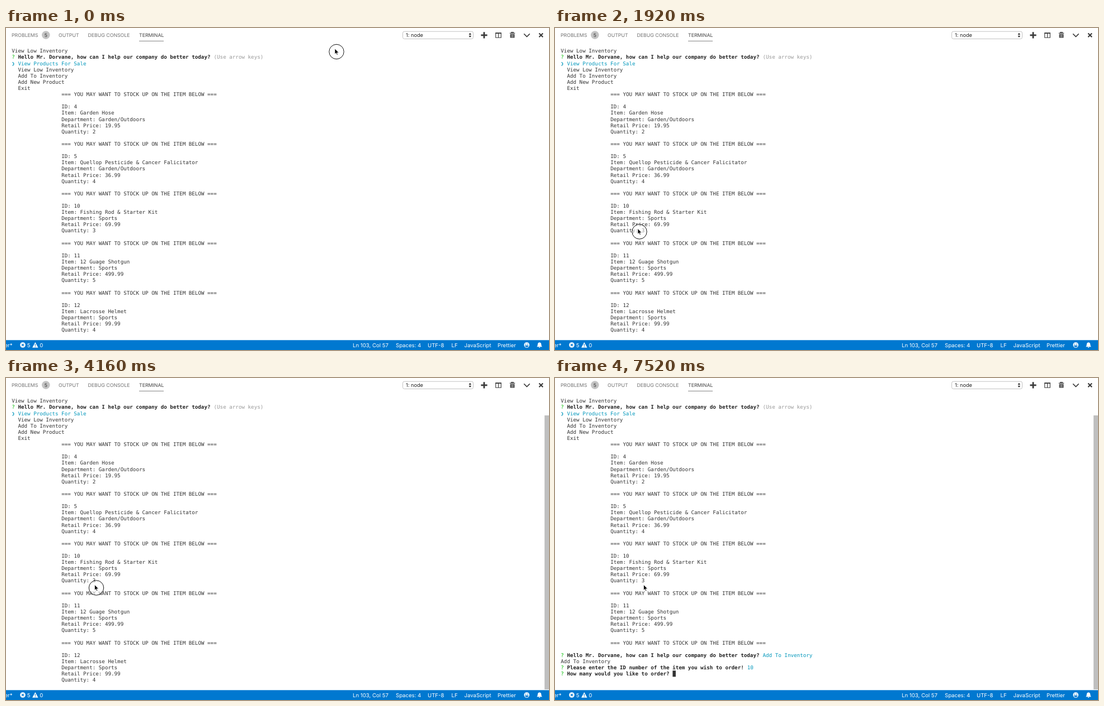
An HTML page that plays this animation: 971 by 577 pixels, repeating every 8000 ms.

```html
<!DOCTYPE html>
<html lang="en">
<head>
<meta charset="utf-8">
<title>Inventory terminal</title>
<style>
html, body { margin: 0; width: 100%; height: 100%; overflow: hidden; background: #fff; }
svg { display: block; }
text { text-rendering: geometricPrecision; white-space: pre; }
#screen { font: 9.23px "DejaVu Sans Mono", monospace; fill: #333; }
#screen .bold { font-weight: bold; fill: #222; }
#screen .green { fill: #00bc00; }
#screen .cyan { fill: #0598bc; }
#screen .dim { fill: #9a9a9a; }
#tabs { font: 8.75px Inter, sans-serif; fill: #717171; }
#status { font: 9.6px Inter, sans-serif; fill: #fff; }
</style>
</head>
<body>
<svg width="971" height="577" viewBox="0 0 971 577">
  <g id="tabs">
    <text x="10" y="16.2">PROBLEMS</text>
    <circle cx="71.3" cy="12.6" r="7.3" fill="#c4c4c4"/>
    <text x="71.3" y="15.8" text-anchor="middle" fill="#333">5</text>
    <text x="94" y="16.2">OUTPUT</text>
    <text x="146.5" y="16.2">DEBUG CONSOLE</text>
    <text x="238" y="16.2" fill="#424242">TERMINAL</text>
    <path d="M238 23.4h44" stroke="#777" stroke-width=".9"/>
    <rect x="709.5" y="6.2" width="126" height="13.3" rx="3" fill="#fff" stroke="#c2c2c2"/>
    <text x="715" y="16.3" fill="#222" font-size="9.2">1: node</text>
    <path d="M827.6 12l2.2-3.2 2.2 3.2zm0 1.8h4.4l-2.2 3.2z" fill="#222"/>
  </g>

  <g id="tools" fill="none" stroke="#3a3a3a">
    <path d="M855 7.3v11.2M849.4 12.9h11.2" stroke-width="2.8"/>
    <path d="M875.7 9v8.3h9.6V9M880.5 9v8.3" stroke-width="1.1"/>
    <path d="M875.1 9.2h10.8" stroke-width="2"/>
    <path d="M900.8 9.4h9.4M903.7 8.6V7.6h3.6v1" stroke-width="1.3"/>
    <path d="M901.6 10.9h7.8v6.6h-7.8z" fill="#3a3a3a" stroke="none"/>
    <path d="M903.8 11.8v4.8M905.5 11.8v4.8M907.2 11.8v4.8" stroke="#fff" stroke-width=".6"/>
    <path d="M926.2 10.4l5.2 5.2 5.2-5.2" stroke-width="1.5"/>
    <path d="M953.3 9.5l6.8 6.8M960.1 9.5l-6.8 6.8" stroke-width="2.1"/>
  </g>

  <g id="screen"></g>
  <rect id="scrollbar" x="963" y="67" width="8" height="491" fill="#bfbfbf"/>

  <g id="status">
    <rect y="559.3" width="971" height="17.7" fill="#0078d0"/>
    <text x="11.5" y="571.6" text-anchor="end">er*</text>
    <circle cx="30" cy="568" r="4.8"/>
    <path d="M28 566l4 4M32 566l-4 4" stroke="#0078d0" stroke-width="1.3"/>
    <text x="37.8" y="571.6">5</text>
    <path d="M52.3 563l5.2 9.8H47.1z"/>
    <path d="M52.3 566.2v3.4M52.3 570.5v1.3" stroke="#0078d0" stroke-width="1.2"/>
    <text x="60.3" y="571.6">0</text>
    <text x="620" y="571.6">Ln 103, Col 57</text>
    <text x="697" y="571.6">Spaces: 4</text>
    <text x="754" y="571.6">UTF-8</text>
    <text x="796.5" y="571.6">LF</text>
    <text x="819.5" y="571.6">JavaScript</text>
    <text x="879" y="571.6">Prettier</text>
    <circle cx="931.2" cy="568" r="4.8"/>
    <path d="M928.7 565.7h1.5v1.5h-1.5zM932.2 565.7h1.5v1.5h-1.5zM928 568.7h6.4a3.2 3 0 0 1-6.4 0z" fill="#0078d0"/>
    <path d="M949 571.2q1.8-1.2 1.8-4.2c0-2.2 1.2-3.4 3.2-3.7 2 .3 3.2 1.5 3.2 3.7q0 3 1.8 4.2zM952.7 571.8h2.6a1.3 1.3 0 0 1-2.6 0z"/>
  </g>

  <g id="pointer">
    <circle id="ring" r="13.2" fill="#fff" fill-opacity=".5" stroke="#111"/>
    <path transform="translate(-3 -5.6)" d="M0 0V9.9l2.2-2 1.6 3.5 1.5-.7-1.5-3.3H7z" stroke="#fff" stroke-width=".7"/>
  </g>
</svg>

<script>
const LOOP = 8000, TICK = 160;
const LEFT = 10.3, CELL = 5.557, BASELINE = 44.3, ROW = 11.11;
const el = id => document.getElementById(id);

const question = "Hello Mr. Dorvane, how can I help our company do better today?";
const choices = ["View Products For Sale", "View Low Inventory", "Add To Inventory", "Add New Product", "Exit"];
const items = [
  [4, "Garden Hose", "Garden/Outdoors", "19.95", 2],
  [5, "Quellop Pesticide &amp; Cancer Falicitator", "Garden/Outdoors", "36.99", 4],
  [10, "Fishing Rod &amp; Starter Kit", "Sports", "69.99", 3],
  [11, "12 Guage Shotgun", "Sports", "499.99", 5],
  [12, "Lacrosse Helmet", "Sports", "99.99", 4]
];

// Pointer path: time, x, y of the ring centre
const path = [
  [0, 591, 42.5], [160, 560, 65], [480, 370, 211], [640, 281, 265], [960, 136, 334],
  [1120, 121, 328.5], [1440, 125, 339], [1920, 151, 365], [2240, 158, 374],
  [2400, 156, 373.5], [2720, 172, 375], [2880, 166, 374.5], [4000, 166, 374.5], [4160, 161.5, 376]
];

function pointerAt(t) {
  const i = path.findIndex(p => p[0] > t);
  if (i < 0) return path.at(-1).slice(1);
  const [a, b] = [path[i - 1], path[i]];
  const k = (t - a[0]) / (b[0] - a[0]);
  return [1, 2].map(n => a[n] + (b[n] - a[n]) * k);
}

const put = (row, col, text, style = "") =>
  `<text class="${style}" x="${LEFT + col * CELL}" y="${BASELINE + row * ROW}">${text}</text>`;

const ask = (row, text) => put(row, 0, "?", "green") + put(row, 2, text, "bold");

const menu = (row, selected) => choices.map((choice, i) => i === selected
  ? put(row + i, 0, "❯", "cyan") + put(row + i, 2, choice, "cyan")
  : put(row + i, 2, choice)).join("");

const caret = (row, col) =>
  `<rect x="${LEFT + col * CELL}" y="${BASELINE + row * ROW - 8.9}" width="${CELL}" height="${ROW}"/>`;

function stock([id, name, department, price, quantity], i, showDetails) {
  const row = 7 + i * 8;
  const details = [`ID: ${id}`, `Item: ${name}`, `Department: ${department}`,
    `Retail Price: ${price}`, `Quantity: ${quantity}`];
  return put(row, 16, "=== YOU MAY WANT TO STOCK UP ON THE ITEM BELOW ===") +
    (showDetails ? details.map((line, n) => put(row + 2 + n, 16, line)).join("") : "");
}

function order(t) {
  const typed = "10".slice(0, t < 6720 ? 0 : t < 6880 ? 1 : 2);
  const done = t >= 7520;
  return put(41, 65, choices[2], "cyan") + put(42, 0, choices[2]) +
    ask(43, "Please enter the ID number of the item you wish to order!") +
    put(43, 60, typed, done ? "cyan" : "") +
    (done ? ask(44, "How many would you like to order?") + caret(44, 36) : caret(43, 60 + typed.length));
}

function screenAt(t) {
  const prompted = t >= 4640;
  let out = put(0, 0, choices[1]) + ask(1, question) + put(1, 65, "(Use arrow keys)", "dim") + menu(2, 0);
  out += items.map((item, i) => stock(item, i, i < 4 || !prompted)).join("");
  if (prompted) out += ask(41, question) + (t < 6080 ? menu(42, t < 5280 ? 1 : 2) : order(t));
  return out;
}

let shown = -1;
function draw(now) {
  const t = Math.floor(now % LOOP / TICK) * TICK;
  if (t !== shown) {
    shown = t;
    el("screen").innerHTML = screenAt(t);
    el("pointer").setAttribute("transform", `translate(${pointerAt(t)})`);
    el("ring").style.display = t < 4320 ? "" : "none";
    el("scrollbar").style.display = t < 4160 ? "none" : "";
  }
  requestAnimationFrame(() => draw(performance.now()));
}
draw(performance.now());
</script>
</body>
</html>
```
